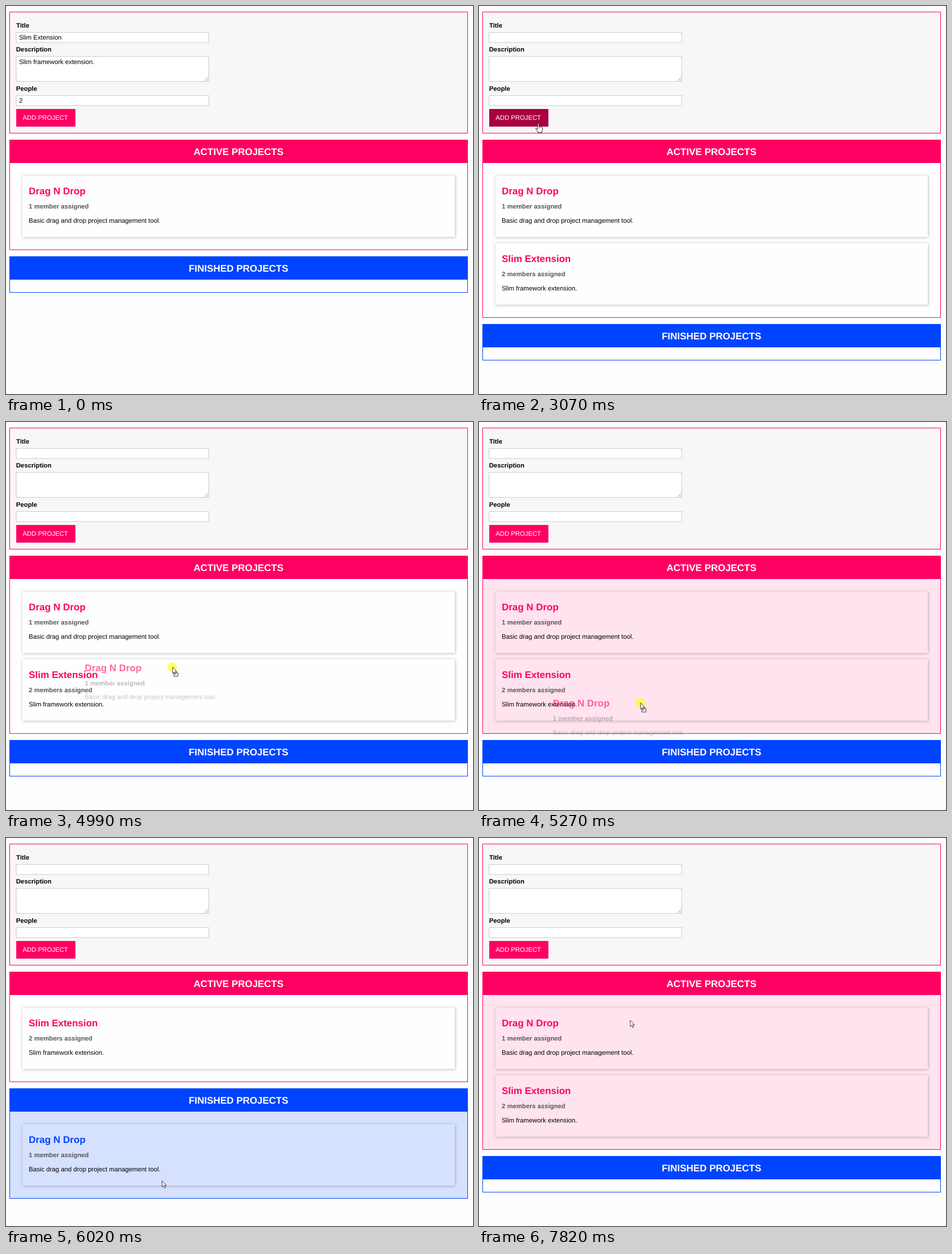
An HTML page for the animation above (8000 ms loop, 821 px wide and 682 px high).

```html
<!DOCTYPE html>
<html lang="en">
<head>
<meta charset="utf-8">
<title>Project board</title>
<style>
  html, body { margin: 0; width: 100%; height: 100%; overflow: hidden; background: #fefefe; }
  svg { display: block; width: 821px; height: 682px; }
  text { font: 11.3px "Liberation Sans", Arial, sans-serif; text-rendering: geometricPrecision; white-space: pre; }
  .b { font-weight: bold; }
  .h2 { font-size: 16.95px; font-weight: bold; }
  .field { fill: #fff; stroke: #ccc; }
</style>
</head>
<body>
<svg viewBox="0 0 821 682">
  <defs>
    <filter id="shadow" x="-5%" y="-20%" width="110%" height="140%">
      <feDropShadow dx=".7" dy=".7" stdDeviation="2.5" flood-color="#000" flood-opacity=".28"/>
    </filter>
  </defs>
  <rect x="6.5" y="10.5" width="805" height="213" fill="#f7f7f7" stroke="#ff0062"/>
  <text class="b" x="18" y="37.5">Title</text>
  <rect class="field" x="18" y="46.5" width="338.5" height="17.5"/>
  <text class="b" x="17.7" y="80">Description</text>
  <rect class="field" x="18" y="88.5" width="338.5" height="44"/>
  <path d="M349.5 131.5l6-6M353 131.5l2.5-2.5" stroke="#777" stroke-width=".8"/>
  <text class="b" x="17.7" y="148.5">People</text>
  <rect class="field" x="18" y="157.5" width="338.5" height="17.5"/>
  <g id="scene"></g>
</svg>
<script>
const LOOP = 8000;
const PINK = '#ff0062', BLUE = '#0044ff';
const scene = document.getElementById('scene');

const DRAG = { title: 'Drag N Drop', people: '1 member assigned', info: 'Basic drag and drop project management tool.' };
const SLIM = { title: 'Slim Extension', people: '2 members assigned', info: 'Slim framework extension.' };

// Pointer stops: the pointer holds each place until the next one.
const stops = [[390, 531, 527], [460, 405, 429]];
const linear = k => k;
const easeOut = k => 1 - (1 - k) ** 2;
const easeInOut = k => k * k * (3 - 2 * k);

function move(start, end, count, x, y, ease) {
  const [, x0, y0] = stops[stops.length - 1];
  for (let i = 1; i <= count; i++) {
    const k = ease(i / count);
    const time = start + (end - start) * (i - 1) / Math.max(1, count - 1);
    stops.push([time, x0 + (x - x0) * k, y0 + (y - y0) * k]);
  }
}
move(730, 1140, 7, 98, 200, easeOut);
move(2940, 3700, 12, 188, 290, easeInOut);
move(3770, 3840, 2, 194, 318, linear);
move(4510, 4510, 1, 194, 319, linear);
move(4780, 4990, 4, 292.5, 430.5, linear);
move(5060, 5540, 8, 275, 556, linear);
move(5600, 6020, 7, 274, 602, easeOut);
move(6680, 6940, 5, 180, 576, easeOut);
move(7290, 7490, 4, 265.5, 320, linear);

const presses = [[1410, 1610], [4040, 6020], [7150, 7820]];
const drags = [
  { start: 4780, end: 6020, top: 298, grab: [194, 324], color: PINK },
  { start: 7290, end: 7820, top: 503, grab: [180, 576], color: BLUE }
];
const during = (t, start, end) => t >= start && t < end;

const rect = (x, y, w, h, fill, extra = '') =>
  `<rect x="${x}" y="${y}" width="${w}" height="${h}" fill="${fill}" ${extra}/>`;
const text = (x, y, str, cls = '', fill = '#000', extra = '') =>
  `<text x="${x}" y="${y}" class="${cls}" fill="${fill}" ${extra}>${str}</text>`;

function cardText(project, top, color, fade = [1, 1, 1]) {
  const alpha = i => `opacity="${fade[i]}"`;
  return text(40, top + 33, project.title, 'h2', color, alpha(0)) +
    text(40, top + 58, project.people, 'b', '#575757', alpha(1)) +
    text(40, top + 82.5, project.info, '', '#000', alpha(2));
}

const panelHeight = cards => cards ? 75 + cards * 119 : 64;

function panel(top, heading, color, projects, fill) {
  const height = panelHeight(projects.length);
  const cards = projects.map((project, i) => {
    const y = top + 63 + i * 119;
    return rect(29, y, 760, 108, fill, 'filter="url(#shadow)"') + cardText(project, y, color);
  });
  return rect(6, top, 806, height, color) +
    rect(7, top + 41, 804, height - 42, fill) +
    text(408.7, top + 26.7, heading, 'h2', '#fff', 'text-anchor="middle"') +
    cards.join('');
}

const ARROW = '<path d="M.4.4V11.3L2.8 9.1 4.6 13.2 6.4 12.4 4.6 8.5H7.9Z" fill="#fff" stroke="#222" stroke-width=".85"/>';
const MOVE_BOX = '<path d="M2.5 10.5h2v-2h2.6v2h2.6v6h-7.2z" fill="#fff" stroke="#223" stroke-width=".9"/>' + ARROW;
const NO_DROP = '<g fill="none" stroke="#26260c" stroke-width="1.5"><circle r="5.8"/><path d="M-4-4 4 4"/></g>';
const HAND = '<path d="M-1.4 10V1a1.2 1.2 0 0 1 2.4 0V6q1.2-1 2.1.3 1.3-.8 2 .4 1.5-.4 1.7 1V11q0 2-1.2 3.5V16H-.8v-1.5Q-3 12-4.8 9.2q-.4-1.8 1.3-1.3z" fill="#fff" stroke="#111" stroke-width=".9"/>';

function draw(t) {
  const pointer = stops.filter(s => s[0] <= t + 0.01).pop();
  const [, x, y] = pointer || [0, -50, -50];
  const drag = drags.find(d => during(t, d.start, d.end));
  const hover = x >= 18 && x < 122 && y >= 181 && y < 212;
  const filled = t < 1610;
  const moved = during(t, 6020, 7820);

  const active = filled ? [DRAG] : moved ? [SLIM] : [DRAG, SLIM];
  const finished = moved ? [DRAG] : [];
  const activeEnd = 235 + panelHeight(active.length);
  const finishedTop = activeEnd + 11;

  // The highlight drops out briefly when the pointer crosses between cards.
  const overActive = drag && y < activeEnd && !during(t, 4990, 5060);
  const overFinished = drag && y >= finishedTop;
  const pinkFill = overActive || t >= 7820 ? '#ffe3ee' : '#fefefe';
  const blueFill = overFinished || during(t, 6020, 7290) ? '#d6e1ff' : '#fefefe';

  let out = '';
  if (filled) {
    out += text(23, 59, SLIM.title) + text(23, 102, SLIM.info) + text(23, 170, '2');
  }
  out += rect(18, 181, 104, 31, hover ? '#a80041' : PINK) + text(29.3, 200, 'ADD PROJECT', '', '#fff');
  out += panel(235, 'ACTIVE PROJECTS', PINK, active, pinkFill);
  out += panel(finishedTop, 'FINISHED PROJECTS', BLUE, finished, blueFill);

  if (drag) {
    const [gx, gy] = drag.grab;
    out += `<g transform="translate(${x - gx} ${y - gy})">${cardText(DRAG, drag.top, drag.color, [.58, .4, .22])}</g>`;
  }
  if (presses.some(p => during(t, ...p))) {
    out += `<circle cx="${x - .3}" cy="${y + .5}" r="8.6" fill="#ff0" fill-opacity=".6"/>`;
  }
  if (pointer) {
    const inGap = drag && y >= activeEnd && y < finishedTop;
    const shape = inGap ? NO_DROP : drag ? MOVE_BOX : hover ? HAND : ARROW;
    out += `<g transform="translate(${x} ${y})">${shape}</g>`;
  }
  return out;
}

let shown = '';
function frame(now) {
  const markup = draw(now % LOOP);
  if (markup !== shown) scene.innerHTML = shown = markup;
  requestAnimationFrame(frame);
}
frame(0);
</script>
</body>
</html>
```
